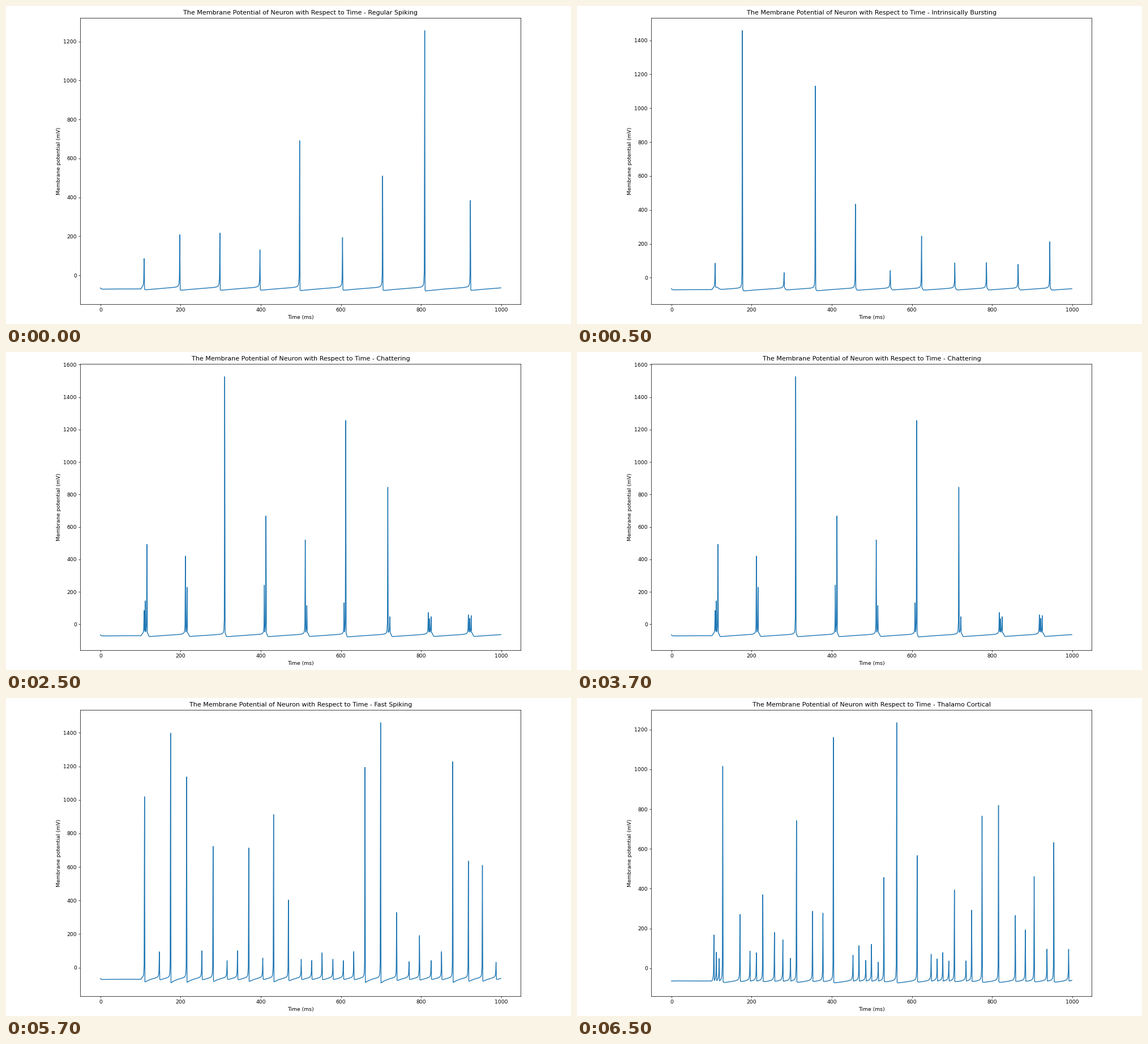
Write a matplotlib script that moves like this. It is 998x561 px and loops after 8000 ms.

```python
import matplotlib.pyplot as plt
from matplotlib.animation import FuncAnimation

WIDTH, HEIGHT, DPI = 998, 561, 64
SCALE = 0.929 * 72 / DPI  # points to the size used on the stage
DURATION, ONSET, DRIVE = 1000, 100, 5
THRESHOLD, START = 30, -65.0

# name: recovery rate, recovery coupling, reset voltage, reset recovery step
NEURONS = {
    "Regular Spiking": (0.02, 0.2, -65, 8),
    "Intrinsically Bursting": (0.02, 0.2, -55, 4),
    "Chattering": (0.02, 0.2, -50, 2),
    "Fast Spiking": (0.1, 0.2, -65, 2),
    "Thalamo Cortical": (0.02, 0.25, -65, 0.05),
}

plt.rcParams.update({
    "font.family": "DejaVu Sans",
    "font.size": 10 * SCALE,
    "axes.titlesize": 12 * SCALE,
    "axes.titlepad": 6 * SCALE,
    "axes.labelpad": 4 * SCALE,
    "axes.linewidth": 0.8 * SCALE,
    "lines.linewidth": 1.5 * SCALE,
})
for axis in ("xtick", "ytick"):
    plt.rcParams.update({
        f"{axis}.major.size": 3.5 * SCALE,
        f"{axis}.major.pad": 3.5 * SCALE,
        f"{axis}.major.width": 0.8 * SCALE,
    })


def simulate(a, b, c, d):
    """Quadratic spiking neuron: 1 ms steps, voltage in two half steps."""
    v, u = START, b * START
    trace = []
    for t in range(DURATION):
        trace.append(v)
        if v >= THRESHOLD:
            v, u = c, u + d
        current = DRIVE if t > ONSET else 0
        for _ in range(2):
            v += 0.5 * (0.04 * v**2 + 5 * v + 140 - u + current)
        u += a * (b * v - u)
    return trace


plots = [(name, simulate(*params)) for name, params in NEURONS.items()]

fig = plt.figure(figsize=(WIDTH / DPI, HEIGHT / DPI), dpi=DPI, facecolor="white")
ax = fig.add_axes([131.45 / WIDTH, 35.45 / HEIGHT, 778 / WIDTH, 505 / HEIGHT])
ax.set_xlabel("Time (ms)")
ax.set_ylabel("Membrane potential (mV)")
line, = ax.plot(range(DURATION), plots[0][1], color="#1f77b4")


def update(frame):
    # the first plot lasts one frame, the others four
    name, trace = plots[(frame + 3) // 4]
    line.set_ydata(trace)
    ax.relim()
    ax.autoscale_view()
    ax.set_title(f"The Membrane Potential of Neuron with Respect to Time - {name}")
    return line,


anim = FuncAnimation(fig, update, frames=16, interval=500, repeat=True,
                     repeat_delay=0, blit=False)
plt.show()
```
